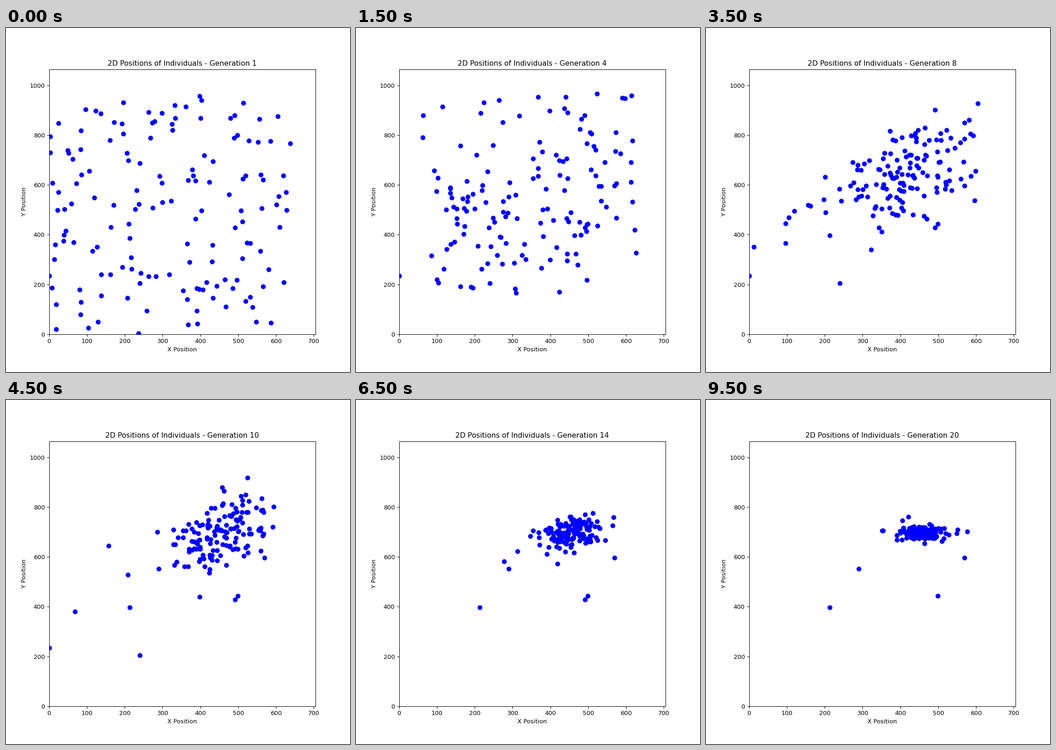
Write a matplotlib script that moves like this. It is 748 by 748 pixels and loops after 10000 ms.

```python
import numpy as np
import matplotlib.pyplot as plt
from matplotlib.animation import FuncAnimation

GENERATIONS = 20
POPULATION = 150
ARENA = np.array([640.5, 968.0])
OPTIMUM = np.array([455, 696])

# The longest-lived individuals: x, y, first generation, last generation
ELDERS = np.array([
    (0, 235, 1, 12), (240, 204, 1, 10), (492, 428, 1, 19), (290, 553, 4, 20),
    (499, 444, 4, 20), (354, 705, 4, 20), (570, 596, 4, 20), (213, 397, 8, 20),
])


def reflect(points):
    """Fold positions that leave the arena back inside."""
    return ARENA - np.abs(ARENA - np.abs(points))


def cloud_shape(generation):
    """Centre, spread and x-y correlation of the converging cloud."""
    age = generation - 1
    approach = 1 - np.exp(-(age / 5) ** 2)
    width = np.exp(-(age / 7) ** 1.5)
    centre = ARENA / 2 + (OPTIMUM - ARENA / 2) * approach
    spread = np.array([30 + 180 * width, 12 + 278 * width])
    correlation = 0.55 * np.sin(np.pi * age / (GENERATIONS - 1))
    return centre, spread, correlation


def breed(rng, generation):
    """Fresh positions around the centre, with a thin lower-left trail."""
    centre, spread, rho = cloud_shape(generation)
    z = rng.normal(size=(POPULATION, 2))
    z[:, 1] = rho * z[:, 0] + np.sqrt(1 - rho ** 2) * z[:, 1]
    if generation > 6:
        z[rng.random(POPULATION) < 0.08] *= 2
    points = centre + spread * z

    along = rng.random((POPULATION, 1))
    trail = np.array([20, 320]) + 270 * along
    trail = trail + rng.normal(size=(POPULATION, 2)) * np.array([25, 60])
    trail_share = 0.22 * np.exp(-((generation - 6.5) / 2.5) ** 2)
    lagging = rng.random(POPULATION) < trail_share
    points[lagging] = trail[lagging]
    return reflect(points)


def evolve(seed=7):
    """Positions of all individuals, one array per generation."""
    rng = np.random.default_rng(seed)
    cloud = rng.random((POPULATION, 2)) * ARENA
    history = []
    for generation in range(1, GENERATIONS + 1):
        if generation > 1:
            centre, spread, _ = cloud_shape(generation)
            distance = np.linalg.norm((cloud - centre) / spread, axis=1)
            kept = (distance < 1.8) & (rng.random(POPULATION) < 0.45)
            cloud = np.where(kept[:, None], cloud, breed(rng, generation))
        alive = (ELDERS[:, 2] <= generation) & (generation <= ELDERS[:, 3])
        elders = ELDERS[alive, :2]
        history.append(np.vstack([cloud[:POPULATION - len(elders)], elders]))
    return history


history = evolve()

fig, ax = plt.subplots(figsize=(8, 8), dpi=93.5)
ax.set_xlim(0, ARENA[0] * 1.1)
ax.set_ylim(0, ARENA[1] * 1.1)
ax.set_xlabel("X Position")
ax.set_ylabel("Y Position")
title = ax.set_title("")
dots = ax.scatter([], [], s=50, c="blue")


def update(frame):
    dots.set_offsets(history[frame])
    title.set_text(f"2D Positions of Individuals - Generation {frame + 1}")
    return dots, title


anim = FuncAnimation(fig, update, frames=GENERATIONS, interval=500,
                     repeat=True, repeat_delay=0)
plt.show()
```
